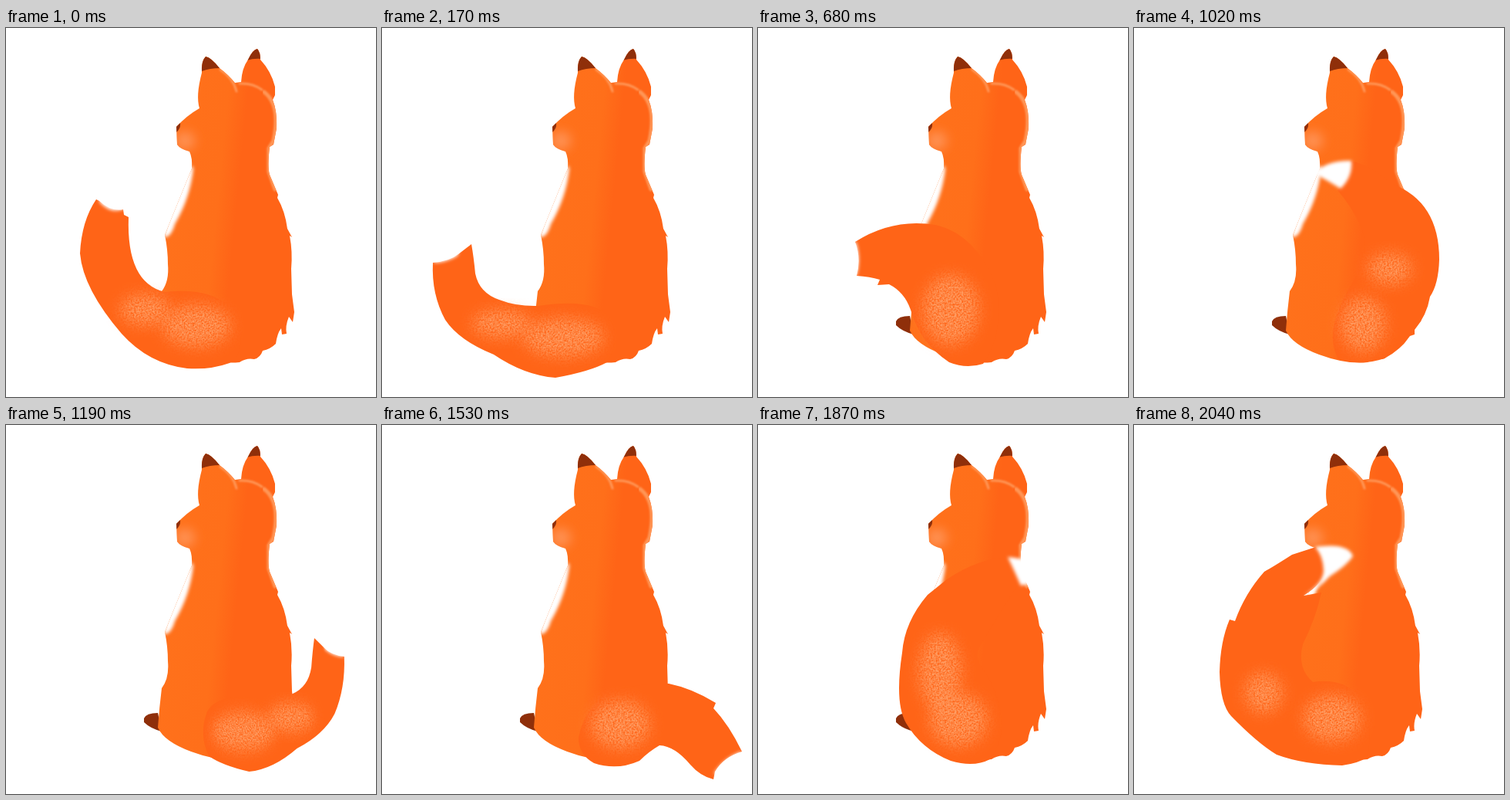
An HTML page that plays this animation: 480 by 478 pixels, repeating every 2.21 s.

```html
<!DOCTYPE html>
<html lang="en">
<head>
<meta charset="utf-8">
<title>Fox swishing its tail</title>
<style>
  html, body { margin: 0; height: 100%; overflow: hidden; background: #fff; }
  svg { display: block; width: 100%; height: 100%; }
  .tail { fill: #ff6417; }
  .tip { fill: #fff; filter: url(#soft); }
  .glow { fill: #ff9c62; filter: url(#grain); }
  .dark { fill: #8f2f0a; }
  .rim { fill: none; stroke: #ff9656; stroke-linecap: round; filter: url(#hair); }
</style>
</head>
<body>
<svg viewBox="0 0 480 478">
  <defs>
    <linearGradient id="coat" gradientUnits="userSpaceOnUse" x1="195" x2="335" y1="0" y2="14">
      <stop offset="0" stop-color="#ff7a2a"/>
      <stop offset=".2" stop-color="#ff711b"/>
      <stop offset=".72" stop-color="#ff6f1a"/>
      <stop offset=".9" stop-color="#ff6417"/>
    </linearGradient>
    <filter id="hair"><feGaussianBlur stdDeviation=".8"/></filter>
    <filter id="soft" x="-30%" y="-30%" width="160%" height="160%"><feGaussianBlur stdDeviation="2"/></filter>
    <filter id="blur" x="-60%" y="-60%" width="220%" height="220%"><feGaussianBlur stdDeviation="7"/></filter>
    <filter id="grain" x="-40%" y="-40%" width="180%" height="180%">
      <feGaussianBlur stdDeviation="9" result="glow"/>
      <feTurbulence type="fractalNoise" baseFrequency=".45" numOctaves="2" seed="4"/>
      <feColorMatrix values="0 0 0 0 0  0 0 0 0 0  0 0 0 0 0  2.2 0 0 0 -.5"/>
      <feComposite in="glow" operator="in"/>
    </filter>
    <clipPath id="outline"><use href="#body"/></clipPath>
  </defs>

  <path class="dark" d="M179 380Q182 373 197 373L202 397Q187 393 179 385Z"/>
  <path id="body" fill="url(#coat)" d="M259 37Q266 38 277 52Q288 60 297 71L305 70Q306 52 314 41Q320 28 326 27Q330 31 330 41Q344 56 349 76V87L346 93Q352 108 351 130L347 151L342 154Q339 180 342 190L353 216L352 220Q362 237 365 260L371 271L368 269Q372 290 370 312L371 345L374 368L372 381L367 374Q362 386 364 396L358 397L357 389Q352 395 350 409Q343 416 333 418Q330 427 322 429Q312 427 303 433Q275 436 240 423Q205 410 197 392Q199 365 202 341Q212 328 210 306Q210 287 206 268L241 182Q242 168 238 160Q226 157 222 151L221 128Q235 113 251 104Q246 88 254 58Q253 43 259 37Z"/>
  <g clip-path="url(#outline)">
    <ellipse cx="232" cy="146" rx="13" ry="12" fill="#ff9152" filter="url(#blur)"/>
    <path d="M241 178Q214 220 204 271Q214 272 219 254Q239 220 243 182Z" fill="#fff" filter="url(#soft)"/>
    <path class="rim" stroke-width="3" d="M278 54Q295 65 299 82M303 72Q320 71 332 80"/>
    <path class="rim" stroke-width="5" d="M335 83Q357 100 347 146L341 156V186L349 209"/>
    <path class="dark" d="M252 34H265L278 52Q264 52 254 56ZM318 24H334L331 40Q322 39 312 42ZM219 126L226 123Q227 130 221 135Z"/>
  </g>
  <g id="tails"></g>
</svg>
<script>
const STEP = 170;

// Each shape: tail outline, white tip, glowing patches as "cx cy rx ry".
const raisedLeft = {
  tail: 'M121 224Q136 238 152 235L153 242L159 245Q156 330 206 342Q285 333 302 383Q310 425 290 434Q265 443 235 441Q185 435 150 396Q100 338 96 292Q98 250 117 222Z',
  tip: 'M147 190Q154 199 153 234Q136 242 121 225Q129 199 147 190Z',
  glow: ['247 386 44 27', '180 365 32 20']
};
const curledLeft = {
  tail: 'M66 304Q88 302 99 293L116 280Q119 297 121 318Q126 343 152 352Q175 361 203 360Q275 349 295 375Q310 405 292 433Q270 445 225 453Q185 450 145 423Q100 405 82 378Q64 345 66 304Z',
  tip: 'M103 259Q103 280 98 295Q83 304 67 304Q75 268 103 259Z',
  glow: ['235 401 52 25', '155 383 38 18']
};
const loweredLeft = {
  tail: 'M42 372Q66 362 76 340L84 326Q98 352 130 352Q170 348 205 338Q270 328 297 365Q312 405 295 433Q260 446 222 440Q180 425 140 424Q65 418 42 372Z',
  tip: 'M42 374Q30 345 33 318Q52 330 77 338Q66 364 42 374Z',
  glow: ['240 388 48 30', '160 385 32 16']
};
const flatLeft = {
  tail: 'M69 391Q100 386 135 355Q190 314 240 314Q292 318 308 362Q316 400 305 430Q280 440 250 432Q220 420 198 397Q185 400 158 420Q125 441 77 443Q81 425 74 408Q87 405 97 398Q83 397 69 394Z',
  tip: 'M33 402Q54 409 75 406Q81 425 77 443Q42 442 33 402Z',
  glow: ['238 365 34 26', '268 388 32 28']
};
const liftingLeft = {
  tail: 'M126 277Q175 246 230 255Q283 267 309 335Q320 395 292 435Q270 442 248 433Q210 408 198 365Q190 342 170 332L155 333L158 326Q145 322 128 321Q134 298 126 277Z',
  tip: 'M89 302Q103 284 127 277Q134 299 128 321Q105 317 89 302Z',
  glow: ['250 365 36 45']
};
const overRight = {
  tail: 'M281 172Q308 178 335 202Q396 225 396 300Q395 332 384 348Q380 372 364 391V397L358 399Q346 417 325 428Q295 438 265 429Q254 408 260 382Q268 352 290 320Q309 288 292 252Q281 230 264 210Q280 196 281 172Z',
  tip: 'M233 188Q251 171 282 172Q284 193 268 208Q252 198 233 188Z',
  glow: ['297 384 29 35', '332 312 28 20']
};
const lowRight = {
  tail: 'M372 335Q402 341 433 360L430 367Q450 388 467 423Q443 430 432 449L430 459Q413 455 400 440Q380 416 360 415Q346 423 334 435Q305 448 275 438Q255 427 255 405Q261 374 285 353Q310 335 372 335Z',
  tip: 'M466 423Q472 447 466 471Q446 467 431 451Q444 431 466 423Z',
  glow: ['309 388 38 31']
};
const overLeft = {
  tail: 'M325 171Q285 173 245 200L220 220Q190 255 187 295Q177 360 192 386Q212 420 250 435Q280 444 301 433Q322 405 314 370Q309 340 289 312Q281 298 287 288L318 237L337 207Q334 188 325 171Z',
  tip: 'M324 171Q360 174 373 190Q361 205 341 208Q333 190 324 171Z',
  glow: ['236 320 27 50', '260 382 37 34']
};
const wrappedLeft = {
  tail: 'M236 158L205 168Q180 184 169 190Q144 218 131 254L124 252Q112 280 111 320Q112 362 126 377Q160 412 185 427Q220 440 270 441Q292 438 303 430Q310 390 297 362Q280 326 232 333Q211 315 219 284Q236 250 243 217L220 221Q246 205 246 190Q248 170 236 158Z',
  tip: 'M235 158Q278 152 284 170Q276 182 254 196Q238 214 220 221Q246 205 246 188Q245 169 235 158Z',
  glow: ['257 380 37 30', '168 347 24 26']
};

const mirror = (shape, x, y = 0, scale = 1) =>
  ({ ...shape, transform: `translate(${x} ${y}) scale(${-scale} 1)` });

const poses = [
  raisedLeft, curledLeft, loweredLeft, flatLeft, liftingLeft, mirror(overLeft, 509),
  overRight, mirror(curledLeft, 490, -4, 0.776), mirror(loweredLeft, 502, 0, 0.815),
  lowRight, mirror(liftingLeft, 524), overLeft, wrappedLeft
];

const patch = values => {
  const [cx, cy, rx, ry] = values.split(' ');
  return `<ellipse class="glow" cx="${cx}" cy="${cy}" rx="${rx}" ry="${ry}"/>`;
};

const tails = document.getElementById('tails');
tails.innerHTML = poses.map(({ tail, tip, glow, transform = '' }) =>
  `<g transform="${transform}">
    <path class="tail" d="${tail}"/>${glow.map(patch).join('')}<path class="tip" d="${tip}"/>
  </g>`).join('');

function draw() {
  const current = Math.floor(performance.now() / STEP) % poses.length;
  [...tails.children].forEach((g, i) => { g.style.display = i === current ? '' : 'none'; });
  requestAnimationFrame(draw);
}
draw();
</script>
</body>
</html>
```
